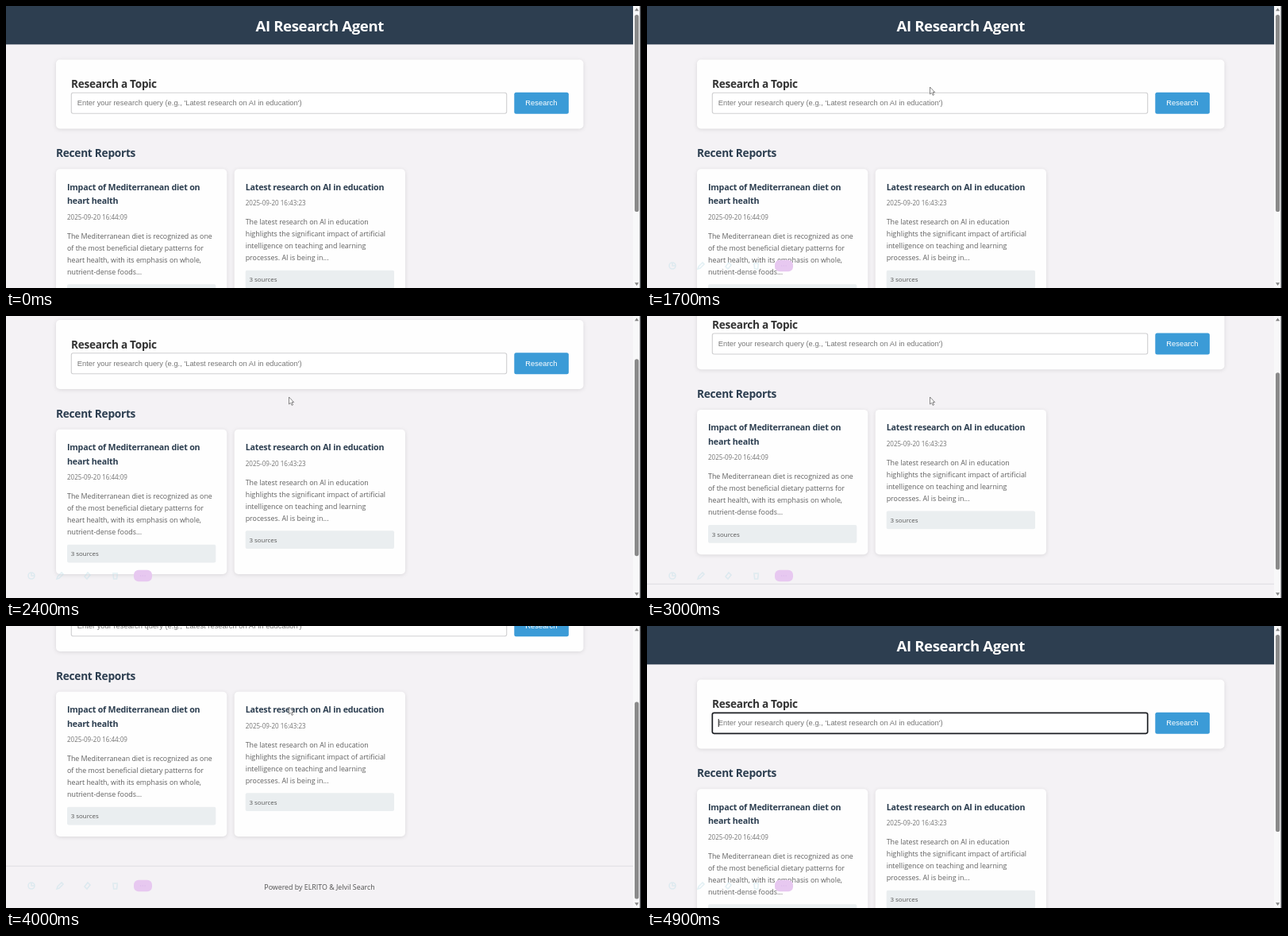
Animation of 800 by 355 pixels, one loop 5.3 s. Source, as an HTML page:

```html
<!DOCTYPE html>
<html lang="en">
<head>
<meta charset="utf-8">
<title>AI Research Agent</title>
<style>
  html, body { margin: 0; width: 100%; height: 100%; overflow: hidden; background: #f4f2f5; }
  svg { display: block; width: 800px; height: 355px; }
  text { font-family: "Open Sans", "Noto Sans", sans-serif; white-space: pre; }
  .bold { font-weight: 700; letter-spacing: -.02em; fill: #2c3e50; }
  .body { font-size: 8.87px; fill: #606060; }
  .date { font-size: 8.05px; fill: #737373; }
  .note { font-size: 7.95px; fill: #555; }
  .form { font-family: "Liberation Sans", Arial, sans-serif; font-size: 9.375px; }
  .panel { fill: #fefefe; filter: drop-shadow(0 1px 2.5px rgba(0, 0, 0, .11)); }
  .mid { text-anchor: middle; }
</style>
</head>
<body>
<svg viewBox="0 0 800 355" xmlns="http://www.w3.org/2000/svg">
  <rect width="800" height="355" fill="#f4f2f5"/>
  <g id="page">
    <rect width="790" height="48.4" fill="#2d3e50"/>
    <text class="bold mid" x="395.2" y="32.2" font-size="18.6" style="fill:#fff">AI Research Agent</text>

    <rect class="panel" x="63" y="67.5" width="664.5" height="87" rx="5"/>
    <text class="bold" x="82" y="103.4" font-size="13.6" style="fill:#333">Research a Topic</text>
    <rect id="input" x="82.3" y="109.3" width="548.4" height="26" rx="2.2" fill="#fff"/>
    <text class="form" x="89.7" y="125" fill="#777">Enter your research query (e.g., 'Latest research on AI in education')</text>
    <rect id="caret" x="89.7" y="117" width="1" height="10" fill="#222"/>
    <rect x="640.3" y="108.8" width="68.6" height="27" rx="2.5" fill="#3b9bd7"/>
    <text class="form mid" x="674.4" y="125" fill="#fff">Research</text>

    <text class="bold" x="63" y="190.4" font-size="13.7">Recent Reports</text>
    <g id="cards"></g>

    <path d="M0 424.7H790" stroke="#dedde1"/>
    <text class="body mid" x="395" y="454.9" style="fill:#505050">Powered by ELRITO &amp; Jelvil Search</text>
  </g>

  <g id="toolbar">
    <g id="icons" fill="none" stroke="#bfdfe8" stroke-width="1.6">
      <circle cx="32" cy="327" r="4"/>
      <path d="M32 323v4h4M64 331l1-3 5-5 2 2-5 5zM99 328l4-5 3 3-4 5zM134 324h7M135 325l.6 6h4l.6-6"/>
    </g>
    <rect x="161" y="319.8" width="23" height="14.4" rx="6" fill="#e7c8f0"/>
    <path d="M169 327h7" stroke="#dcb6ea" stroke-width="1.2" stroke-dasharray="1.2 1.6"/>
  </g>

  <rect x="790" width="10" height="355" fill="#f8f8f9"/>
  <rect x="798.6" width="1.4" height="355" fill="#33363a"/>
  <path d="M792 6.2l2.6-3.8 2.6 3.8zM792 348.3l2.6 3.8 2.6-3.8z" fill="#858585"/>
  <rect id="thumb" x="792" width="5.2" height="248" rx="2.6" fill="#8a8a8a"/>
  <path id="pointer" d="M0 0V9L2.1 7.2 3.6 10.4 5 9.8 3.6 6.6H6.2Z" fill="#fff" stroke="#555" stroke-width=".7" stroke-linejoin="round"/>
</svg>
<script>
const LOOP = 5300, TICK = 100;
const $ = id => document.getElementById(id);

const reports = [
  { x: 63, title: ["Impact of Mediterranean diet on", "heart health"], date: "2025-09-20 16:44:09",
    body: ["The Mediterranean diet is recognized as one", "of the most beneficial dietary patterns for",
           "heart health, with its emphasis on whole,", "nutrient-dense foods..."] },
  { x: 287.7, title: ["Latest research on AI in education"], date: "2025-09-20 16:43:23",
    body: ["The latest research on AI in education", "highlights the significant impact of artificial",
           "intelligence on teaching and learning", "processes. AI is being in..."] }
];

const line = (cls, x, y, str, extra = "") => `<text class="${cls}" x="${x}" y="${y}" ${extra}>${str}</text>`;

function card({ x, title, date, body }) {
  const left = x + 14, shift = (title.length - 1) * 17.5;
  return `<rect class="panel" x="${x}" y="205.2" width="215.3" height="182.3" rx="5"/>` +
    title.map((s, i) => line("bold", left, 231.8 + i * 17.5, s, 'font-size="10.7"')).join("") +
    line("date", left, 251 + shift, date) +
    body.map((s, i) => line("body", left, 275 + shift + i * 15, s)).join("") +
    `<rect x="${left}" y="${332.8 + shift}" width="187.3" height="22.8" rx="2" fill="#eaeef0"/>` +
    line("note", left + 4.7, 347.4 + shift, "3 sources");
}
$("cards").innerHTML = reports.map(card).join("");

// Each entry holds from its time until the next one.
const scrollSteps = [
  [0, 0], [2200, 3.6], [2300, 42], [2400, 62.5],
  [2900, 66], [3000, 87.3], [3100, 111], [3200, 120.5], [3300, 122.5],
  [4100, 50], [4200, 1.7], [4300, 0]
];
const pointerSteps = [
  [0, null], [1100, [349.5, 106.7]], [1200, [353, 104.5]], [1300, [355, 103]],
  [1600, [356.5, 102]], [4600, null]
];
const held = (steps, t) => steps.reduce((value, [at, next]) => t >= at ? next : value, steps[0][1]);
const show = (el, on) => el.setAttribute("visibility", on ? "visible" : "hidden");

function draw(ms) {
  const t = Math.floor(ms % LOOP / TICK) * TICK;
  const scroll = held(scrollSteps, t), pos = held(pointerSteps, t), focused = t >= 4700;

  $("page").setAttribute("transform", `translate(0 ${-scroll})`);
  $("thumb").setAttribute("y", 11 + scroll * .69);

  show($("pointer"), pos);
  if (pos) $("pointer").setAttribute("transform", `translate(${pos})`);

  show($("toolbar"), t >= 1100);
  $("icons").setAttribute("opacity", t < 1300 ? .25 : .42);

  $("input").setAttribute("stroke", focused ? "#1c1f24" : "#cfcfd1");
  $("input").setAttribute("stroke-width", focused ? 1.7 : 1.1);
  show($("caret"), focused);
}

const start = performance.now();
function loop() {
  draw(performance.now() - start);
  requestAnimationFrame(loop);
}
loop();
</script>
</body>
</html>
```
